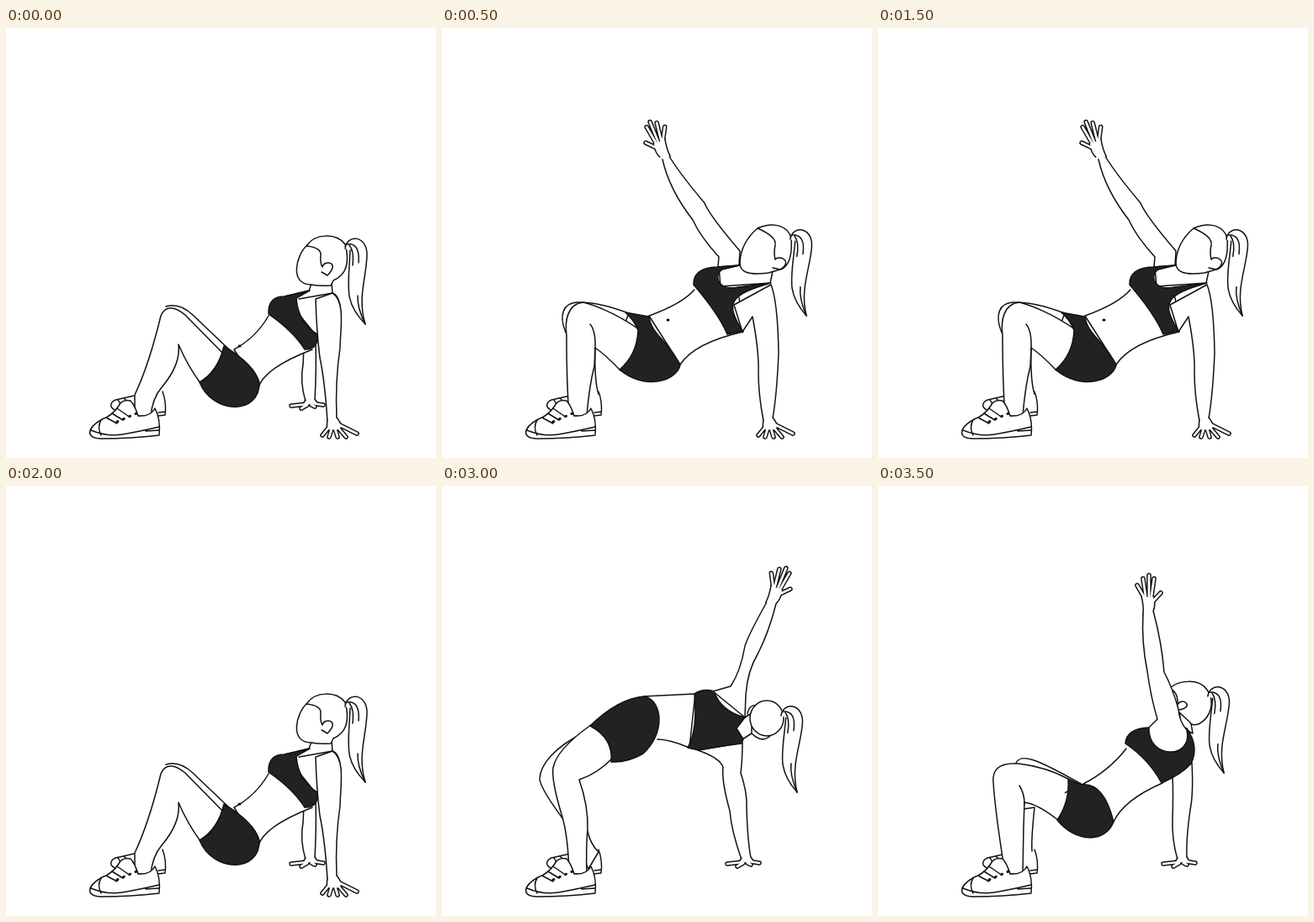
Animation of 511 by 511 pixels, one loop 4 s. Source, as an HTML page without scripts:

```html
<!DOCTYPE html>
<html lang="en">
<head>
<meta charset="utf-8">
<title>Crab reach exercise</title>
<style>
html, body { margin: 0; width: 100%; height: 100%; overflow: hidden; background: #fff; }
svg { display: block; width: 100vw; height: 100vh; fill: #fff; stroke: #111; stroke-width: 1.5; stroke-linecap: round; stroke-linejoin: round; }
.line { fill: none; }
.dark { fill: #222; }
.dot { stroke-width: 3; }
.eyelets { stroke-width: 3; stroke-dasharray: 1 7; }
.edge { stroke-width: 5.6; }
.skin { stroke: #fff; stroke-width: 2.7; }
.pose { visibility: hidden; animation: once 4s step-end infinite; }
.sit { animation: half 2s step-end infinite; }
.left-rise { animation-name: twice; animation-delay: -3.5s; }
.left-top { animation-delay: -3s; }
.right-rise { animation-name: twice; animation-delay: -1.5s; }
.right-top { animation-delay: -1s; }
@keyframes half { 0% { visibility: visible } 25%, 100% { visibility: hidden } }
@keyframes once { 0% { visibility: visible } 12.5%, 100% { visibility: hidden } }
@keyframes twice { 0%, 25% { visibility: visible } 12.5%, 37.5%, 100% { visibility: hidden } }
</style>
</head>
<body>
<svg viewBox="0 0 511 511">
<defs>
  <path id="near-fingers" d="M385 473L376 484M387 476L384 486M391 476L394 486M393 473L404 486M395 471L417 482"/>
  <g id="near-hand">
    <use href="#near-fingers" class="edge"/>
    <path d="M382 466Q380 478 384 478H396Q402 474 393 463"/>
    <use href="#near-fingers" class="skin"/>
  </g>
  <path id="far-fingers" d="M357 447L339 449M358 448L351 452M363 448L367 450M364 446L377 448"/>
  <g id="far-hand">
    <use href="#far-fingers" class="edge"/>
    <path d="M356 442L352 448H372L367 441"/>
    <use href="#far-fingers" class="skin"/>
  </g>
  <path id="open-fingers" d="M-5-19L-13-33M-3-20L-6-41M1-20L1-45M4-20L7-41M3-11L15-24"/>
  <g id="open-hand">
    <use href="#open-fingers" class="edge"/>
    <path d="M-6 2Q-5-8-8-20H7Q9-8 6-2"/>
    <use href="#open-fingers" class="skin"/>
  </g>
  <g id="tail">
    <path d="M403 262C405 245 428 246 429 268C429 295 417 320 427 352C401 325 407 310 409 264"/>
    <path class="line" d="M405 257Q421 255 419 279M408 258Q414 265 412 282M427 352Q417 332 418 318"/>
  </g>
</defs>

<!-- far shoe, behind every pose -->
<path d="M152 437L130 442C120 446 124 458 143 454M186 432Q191 445 189 460L180 461"/>
<path class="line" d="M133 442Q138 447 134 455M140 440L146 445M181 457L189 456"/>

<g class="pose sit">
  <path d="M356 444Q349 420 353 400L354 380L368 375Q369 405 367 442"/>
  <use href="#far-hand"/>
  <path d="M190 331Q206 326 222 341L264 381L240 395"/>
  <path d="M262 391L213 341Q192 324 184 342Q170 400 153 436V461H172Q174 440 185 427Q208 400 205 376Q215 400 231 422"/>
  <path d="M312 342Q297 368 271 382L300 428Q305 405 364 382"/>
  <path class="dark" d="M259 378Q295 400 301 421C302 460 246 460 230 421Q252 408 259 378Z"/>
  <path class="dot" d="M277 378h1"/>
  <path d="M363 304L360 312L331 319L369 366L398 345Q398 318 388 315L386 292"/>
  <path class="dark" d="M312 340Q311 319 331 319L361 312L345 321Q347 350 370 364Q372 382 355 382Q341 360 312 340Z"/>
  <path d="M382 468Q379 420 373 392Q369 360 368 322L388 315C404 325 397 360 397 380Q391 420 393 464"/>
  <path class="line" d="M348 322L388 315"/>
  <use href="#near-hand"/>
  <path d="M357 259C368 243 393 244 403 257Q412 290 389 300L386 306Q372 307 363 305C336 305 345 270 357 259Z"/>
  <path class="line" d="M357 259Q375 261 374 270T376 284C378 275 398 278 382 294L375 290"/>
  <use href="#tail"/>
</g>

<g class="pose left-rise">
  <path d="M186 435Q181 420 182 380L165 420V450"/>
  <path d="M147 362C138 340 145 327 160 326Q185 325 222 339L210 370"/>
  <path d="M234 358C205 338 180 329 168 326C148 328 146 350 148 365Q148 420 151 461H172Q175 425 181 402L182 380Q194 388 212 407"/>
  <path class="line" d="M182 382Q183 360 176 352"/>
  <path d="M300 311Q285 328 246 342L283 400Q300 374 358 361L353 320"/>
  <path class="dark" d="M218 338L246 343C249 365 270 372 283 401C277 421 240 430 211 406Q232 388 233 359Q228 347 218 338Z"/>
  <path class="dot" d="M268 347h1"/>
  <path d="M353 270L329 284L331 307L390 303L394 284"/>
  <path d="M268 149Q280 170 312 208Q318 223 354 265L353 282L328 284L329 272Q307 248 298 228Q270 192 262 156"/>
  <use href="#open-hand" transform="translate(265 153) rotate(-22) scale(-1 1)"/>
  <path d="M382 467Q376 435 376 410Q377 385 369 343L357 361L347 329L391 305Q399 325 400 386Q398 435 393 464"/>
  <path class="dark" d="M299 305Q298 285 327 284L354 282L333 287C323 292 326 313 352 308L391 303C342 317 336 326 357 360L339 364Q329 340 299 305Z"/>
  <use href="#near-hand"/>
  <path d="M375 238C395 229 412 236 415 250Q417 278 405 286L388 291C363 294 354 290 354 279Q355 255 375 238Z"/>
  <path class="line" d="M375 238Q398 248 396 258T396 275C400 269 418 277 402 287L393 285"/>
  <use href="#tail" transform="translate(11 -11) rotate(3 404 259)"/>
</g>

<g class="pose left-top">
  <path d="M186 436Q180 425 181 388Q184 360 178 341L149 354Q163 390 165 425"/>
  <path d="M160 298Q115 322 106 338C97 355 110 366 112 370Q142 410 142 440L148 461H172Q160 440 160 420Q161 385 135 356Q155 355 180 341"/>
  <path d="M220 256Q240 243 313 243L302 314Q265 297 253 312"/>
  <path class="dark" d="M159 298Q190 266 221 255Q223 297 253 313C240 336 210 335 178 341Q162 315 159 298Z"/>
  <path class="dot" d="M251 255h2"/>
  <path d="M390 98Q387 120 375 160Q374 190 357 237L343 242L380 266Q375 255 384 234Q383 210 393 180Q403 145 406 96"/>
  <path class="line" d="M371 226Q368 238 343 242"/>
  <use href="#open-hand" transform="translate(398 98) rotate(7) scale(1.2 .9)"/>
  <path d="M382 468Q374 425 366 400Q355 370 354 342Q345 322 325 321L335 300L376 304L380 334Q378 370 389 397Q394 425 394 464"/>
  <path class="line" d="M327 320Q356 321 363 337"/>
  <path class="dark" d="M312 241Q335 234 380 266C345 257 335 262 338 276Q343 300 380 304L378 308Q333 298 325 321L301 313Q300 270 312 241Z"/>
  <use href="#near-hand"/>
  <path d="M417 251C436 252 448 266 448 281C446 300 425 302 405 301C360 303 365 253 417 251Z"/>
  <path class="line" d="M420 252Q434 266 426 288L424 300C419 308 409 306 405 299"/>
  <use href="#tail" transform="translate(40 34) rotate(13 404 259)"/>
</g>

<g class="pose right-rise">
  <path d="M356 444Q349 420 350 395Q351 365 350 345L373 329Q375 365 371 385Q366 420 367 442"/>
  <use href="#far-hand"/>
  <path d="M183 434Q182 420 186 382L172 384V445"/>
  <path d="M164 329C170 318 185 322 243 355L210 370"/>
  <path d="M226 348Q200 334 168 330C140 328 136 340 137 352Q139 385 151 461H172L173 405L174 376Q190 378 214 397"/>
  <path class="line" d="M174 378Q174 365 168 356"/>
  <path d="M295 312Q275 338 244 354L280 399Q292 373 338 353"/>
  <path class="dark" d="M226 348L241 355Q268 351 280 399C270 425 235 424 213 397Q228 375 226 348Z"/>
  <path d="M358 264L360 287L374 294L372 282"/>
  <path class="dark" d="M294 306Q295 288 323 287L367 288Q382 310 372 330Q360 343 337 353Q322 325 294 306Z"/>
  <path d="M347 240C357 231 381 228 391 242C401 256 396 275 381 283Q372 285 371 281L357 268Z"/>
  <path class="line" d="M347 241Q357 245 356 260C360 250 378 262 358 266"/>
  <path d="M315 152Q313 185 320 220Q324 250 332 277L322 287C320 325 375 325 367 290Q358 280 357 265Q350 240 340 221Q337 185 327 148"/>
  <use href="#open-hand" transform="translate(321 151)"/>
  <use href="#tail" transform="translate(-11 -12) rotate(3 404 259)"/>
</g>

<g class="pose right-top">
  <path d="M167 294C135 310 117 330 116 348Q117 360 147 400L174 455L186 435Q176 425 173 410"/>
  <path d="M177 284Q136 313 132 335Q130 350 142 390Q150 415 151 461H172Q171 430 173 408Q174 380 163 349Q185 342 204 322"/>
  <path d="M240 250L301 247L294 311Q270 301 256 301"/>
  <path d="M356 444Q344 410 342 386Q332 350 334 334Q330 323 304 314L357 305Q357 325 355 341Q363 365 362 382Q363 420 367 442"/>
  <use href="#far-hand"/>
  <path class="dark" d="M176 285Q210 252 241 250C263 256 265 295 239 318Q220 329 201 328Q204 300 176 285Z"/>
  <path d="M386 138Q365 175 360 190Q355 220 343 238L322 244L360 275L361 248Q363 220 375 200Q388 175 397 140"/>
  <use href="#open-hand" transform="translate(391 139) rotate(22)"/>
  <path d="M360 275L368 270V294L357 301"/>
  <path class="dark" d="M300 247Q310 240 323 244Q332 268 360 275L350 288L358 301L356 306Q325 310 305 314L292 311Q304 290 300 247Z"/>
  <path d="M363 271Q365 258 377 261M368 294Q380 306 390 297"/>
  <ellipse cx="386" cy="276" rx="20" ry="21"/>
  <use href="#tail" transform="translate(0 11) rotate(3 404 259)"/>
</g>

<!-- near shoe, in front of every pose -->
<path d="M148 443Q138 441 134 449Q126 461 114 465C95 476 95 488 113 488Q148 488 182 484Q184 465 177 452Q172 462 157 461Q153 448 148 443Z"/>
<path class="line" d="M101 478Q120 486 138 483T182 474M113 466Q108 474 113 484M166 479L182 478M119 463L132 470M126 458L139 466M132 452L145 461"/>
<path class="eyelets" d="M132 468L155 458"/>
</svg>
</body>
</html>
```
